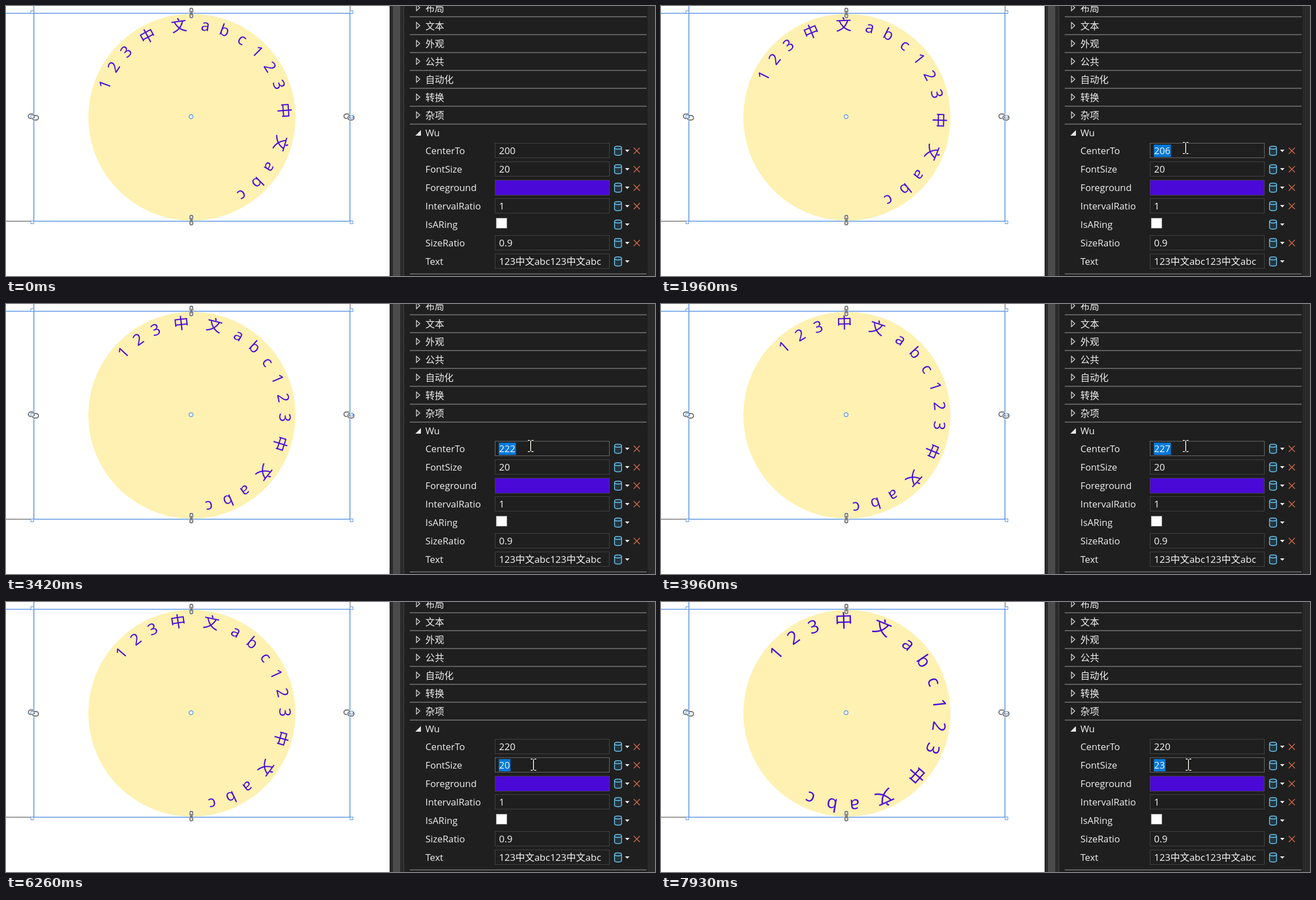
Recreate the animation shown at these times as an HTML page with a canvas. Size 1159 by 483 pixels, loop 8 s.

```html
<!DOCTYPE html>
<html lang="zh-CN">
<head>
<meta charset="utf-8">
<title>Ring text</title>
<style>
html, body { margin: 0; width: 100%; height: 100%; overflow: hidden; background: #fff; }
canvas { display: block; }
</style>
</head>
<body>
<canvas id="stage" width="1159" height="483"></canvas>
<script>
const g = document.getElementById('stage').getContext('2d');
const LOOP = 8000;
const FONT = '"Open Sans", "Noto Sans CJK SC", "Noto Sans CJK", sans-serif';
const RING = '123中文abc123中文abc';
const BLUE = '#5a95e2', INK = '#4b09d8', PANEL = '#1f1f1f';
const CX = 332, CY = 199, R = 185;

// Bursts of changes: start time, spacing, then the successive values.
const centerBursts = [
  [0, 0, 200], [1290, 85, 201, 202, 203, 204, 205], [1960, 74, 206, 208, 210],
  [2410, 70, 211, 212, 214, 215], [2950, 70, 217, 218, 220],
  [3420, 70, 222, 224, 226], [3960, 70, 227, 228, 229, 230], [5370, 0, 220]
];
const sizeBursts = [
  [0, 0, 20], [7000, 95, 21, 22, 23], [7400, 70, 24, 25], [7600, 0, 24], [7860, 0, 23]
];
const typed = [[4700, 170, '2', '22', '220']];
// Mouse path: time, x, y.
const approach = [[200, 950, 393], [340, 945, 345], [480, 939, 268], [550, 936, 244], [690, 937, 254]];
const toSize = [[5440, 937, 254], [5650, 947, 268], [5850, 944, 288], [5990, 942, 291]];

function valueAt(bursts, t) {
  let out;
  for (const [start, gap, ...vals] of bursts)
    vals.forEach((v, i) => { if (t >= start + i * gap) out = v; });
  return out;
}

function pathAt(path, t) {
  const q = Math.floor(t / 70) * 70 + 10;
  let a = path[0];
  for (const b of path) {
    if (q < b[0]) {
      const k = Math.max(0, (q - a[0]) / (b[0] - a[0] || 1));
      return [a[1] + (b[1] - a[1]) * k, a[2] + (b[2] - a[2]) * k];
    }
    a = b;
  }
  return [a[1], a[2]];
}

function rect(x, y, w, h, fill, stroke) {
  if (fill) { g.fillStyle = fill; g.fillRect(x, y, w, h); }
  if (stroke) { g.strokeStyle = stroke; g.strokeRect(x + .5, y + .5, w - 1, h - 1); }
}

function poly(pts, fill, stroke, open) {
  g.beginPath();
  pts.forEach(([x, y], i) => i ? g.lineTo(x, y) : g.moveTo(x, y));
  if (!open) g.closePath();
  if (fill) { g.fillStyle = fill; g.fill(); }
  if (stroke) { g.strokeStyle = stroke; g.stroke(); }
}

function line(x1, y1, x2, y2, color, width = 1) {
  g.lineWidth = width;
  poly([[x1, y1], [x2, y2]], null, color, true);
  g.lineWidth = 1;
}

function text(s, x, y, size = 17, color = '#f1f1f1') {
  g.font = size + 'px ' + FONT;
  g.fillStyle = color;
  g.fillText(s, x, y + 6);
}

function handle(x, y) { rect(x - 3, y - 3, 6, 6, '#fff', BLUE); }

function link(x, y, w, h) {
  g.beginPath();
  g.roundRect(x - w / 2, y - h / 2, w, h, Math.min(w, h) / 2);
  g.lineWidth = 3.4; g.strokeStyle = '#fff'; g.stroke();
  g.lineWidth = 1.9; g.strokeStyle = '#707070'; g.stroke();
  g.lineWidth = 1;
}

function chainH(x, y) { link(x - 3, y - 1.3, 11, 8); link(x + 4, y + 1.5, 11, 8); }
function chainV(x, y) {
  link(x, y - 4.5, 5, 8);
  link(x, y + 4.5, 5, 8);
  line(x, y - 4, x, y + 4, '#707070', 1.8);
}

function drawRing(start, size) {
  const em = size * 1.4;
  const narrow = 12.2 + .65 * (size - 20), wide = 20.6 + 1.23 * (size - 20);
  g.fillStyle = INK;
  g.font = em + 'px ' + FONT;
  g.textAlign = 'center';
  let angle = start + .6, last = 0;
  for (const ch of RING) {
    const cjk = ch > '\u2000', w = cjk ? wide : narrow;
    if (last) angle += (last + w) / 2;
    last = w;
    g.save();
    g.translate(CX, CY);
    g.rotate((angle + 90) * Math.PI / 180);
    g.fillText(ch, 0, -(R * .9 - .365 * em - (cjk ? .8 : 0)));
    g.restore();
  }
  g.textAlign = 'left';
}

function drawDesigner(start, size) {
  rect(0, 0, 685, 483, '#fff');
  line(614.5, 0, 614.5, 13, '#777', 1.4);
  line(0, 385, 50, 385, '#777', 1.4);
  g.fillStyle = '#fef1b1';
  g.beginPath(); g.arc(CX, CY, R, 0, 7); g.fill();
  drawRing(start, size);
  line(0, 13, 615, 13, BLUE, 1.6);
  line(49.7, 0, 49.7, 385, BLUE, 1.6);
  line(614.3, 13, 614.3, 385, BLUE, 1.6);
  line(49, 385, 615, 385, BLUE, 1.6);
  for (const x of [47, 617]) for (const y of [11, 387]) handle(x, y);
  chainV(331, 12.5); chainV(331, 383);
  chainH(48.5, 198.5); chainH(612, 198.5);
  handle(47, 198); handle(617, 198);
  g.beginPath(); g.arc(330.5, 198, 3.5, 0, 7);
  g.fillStyle = '#fff'; g.fill();
  g.lineWidth = 1.4; g.strokeStyle = BLUE; g.stroke(); g.lineWidth = 1;
}

function drawMarks(y, clear) {
  g.lineWidth = 1.5;
  g.strokeStyle = '#6cc3ee';
  g.fillStyle = '#24343d';
  g.beginPath();
  g.moveTo(1086.7, y - 5.5);
  g.lineTo(1086.7, y + 5.5);
  g.ellipse(1093, y + 5.5, 6.3, 2.7, 0, Math.PI, 0, true);
  g.lineTo(1099.3, y - 5.5);
  g.fill(); g.stroke();
  g.beginPath(); g.ellipse(1093, y - 5.5, 6.3, 2.7, 0, 0, 7); g.fill(); g.stroke();
  g.lineWidth = 1;
  poly([[1105.5, y - 2], [1113.5, y - 2], [1109.5, y + 2.2]], '#f1f1f1');
  if (!clear) return;
  line(1121, y - 5.5, 1132, y + 5.5, '#d4694a', 1.5);
  line(1132, y - 5.5, 1121, y + 5.5, '#d4694a', 1.5);
}

function drawField(y, value, focus, selected, caret) {
  rect(873, y - 13.5 | 0, 205, 27, PANEL, focus ? '#6b6b6b' : '#434346');
  g.font = '17px ' + FONT;
  const w = g.measureText(value).width;
  if (selected) rect(880, y - 11, w + 1.5, 22, '#0078d7');
  text(value, 880.5, y, 17, '#fafafa');
  if (caret) rect(Math.round(881 + w), y - 10, 1.6, 21, '#fff');
}

function drawPanel(t, center, size) {
  rect(685, 0, 474, 483, '#2a2a2a');
  rect(691, 0, 13, 483, '#4b4b4b');
  rect(710, 0, 1, 483, '#444');
  rect(711, 0, 435, 483, PANEL);

  ['布局', '文本', '外观', '公共', '自动化', '转换', '杂项'].forEach((s, i) => {
    const y = 3 + i * 32;
    g.lineWidth = 1.3;
    poly([[733, y - 5.5], [739, y], [733, y + 5.5]], null, '#dcdcdc');
    text(s, 749, y + .5, 16.8);
    rect(721, 18.5 + i * 32, 423, 1.6, '#747474');
  });
  rect(721, 478.5, 423, 1.6, '#747474');
  poly([[741, 222], [741, 232], [731, 232]], '#e6e6e6');
  text('Wu', 749, 227, 16.8);

  const typing = t >= 4700 && t < 6130;
  const onCenter = t >= 690 && t < 6130, onSize = t >= 6130;
  const shown = t >= 4700 && t < 5370 ? valueAt(typed, t) : center;
  ['CenterTo', 'FontSize', 'Foreground', 'IntervalRatio', 'IsARing', 'SizeRatio', 'Text'].forEach((name, i) => {
    const y = 259 + i * 33;
    text(name, 749, y, 16.8);
    drawMarks(y, i !== 4 && i !== 6);
  });
  drawField(259, String(shown), onCenter, t >= 760 && t < 4700, typing || t >= 690 && t < 760);
  drawField(292, String(size), onSize, t >= 6260, onSize && t < 6260);
  rect(873, 311, 205, 28, INK, '#434346');
  drawField(358, '1');
  rect(875, 379, 20, 19, '#fff', '#8a8a8a');
  drawField(424, '0.9');
  drawField(457, RING);
}

function beam(x, y) {
  const strokes = (color, w) => {
    line(x, y - 9.5, x, y + 9.5, color, w);
    for (const d of [-10, 10]) {
      line(x - 5, y + d, x - 1.5, y + d, color, w);
      line(x + 1.5, y + d, x + 5, y + d, color, w);
    }
  };
  strokes('#000', 3.4);
  strokes('#f2f2ea', 1.7);
}

function arrow(x, y) {
  const pts = [[0, 0], [0, 16], [4, 12.5], [6.5, 18], [9, 17], [6.5, 11.5], [11.5, 11.5]];
  poly(pts.map(([dx, dy]) => [x + dx, y + dy]), '#fff', '#000');
}

function drawMouse(t) {
  if (t < 200 || t >= 4700 && t < 5440) return;
  const [x, y] = pathAt(t < 4700 ? approach : toSize, t);
  (y > 305 ? arrow : beam)(x, y);
}

function frame() {
  const t = performance.now() % LOOP;
  const center = valueAt(centerBursts, t), size = valueAt(sizeBursts, t);
  drawDesigner(center, size);
  drawPanel(t, center, size);
  drawMouse(t);
  requestAnimationFrame(frame);
}
frame();
</script>
</body>
</html>
```
